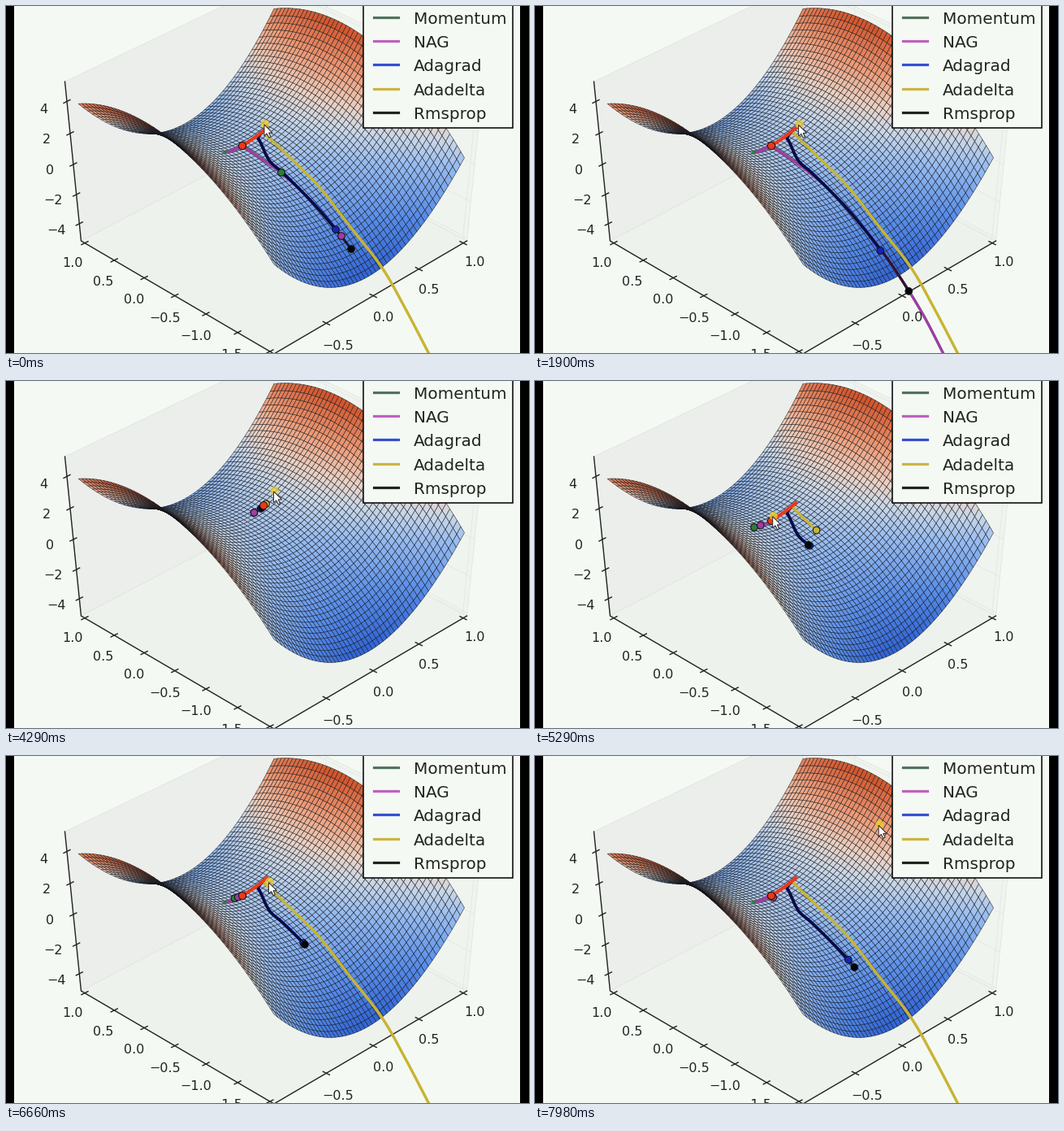
Recreate the animation shown at these times as a matplotlib script. Size 644 by 427 pixels, loop 8000 ms.

```python
import numpy as np
import matplotlib.pyplot as plt
from matplotlib.animation import FuncAnimation
from matplotlib.collections import PolyCollection
from matplotlib.colors import LinearSegmentedColormap
from matplotlib.patches import Circle, Polygon, Rectangle

W, H, DPI = 644, 427, 100
PT = 72 / DPI                       # points per pixel
LOOP, STEP = 8000, 100
RESET, PERIOD = 4150, 9300          # moment the descent restarts, its full length
PAPER, INK = "#f4f9f4", "#20241f"
EDGE = 0.5208                       # panes reach slightly past the unit cube

plt.rcParams["font.family"] = "DejaVu Sans"
# The tiny surplus keeps the pixel size from being rounded down
fig = plt.figure(figsize=((W + 1e-4) / DPI, (H + 1e-4) / DPI), dpi=DPI, facecolor=PAPER)
ax = fig.add_axes([0, 0, 1, 1])
ax.set(xlim=(0, W), ylim=(H, 0))
ax.axis("off")


def project(p, q, h):
    """Map cube coordinates (-.5 to .5) to screen x, y and depth."""
    v, u = (p + q) * 0.7071, (p - q) * 0.7071
    w = 1 - 0.079 * u - 0.0775 * h
    return 330 + 335.5 * v / w, 195 + (177.9 * u - 187.9 * h) / w, w


def corner(p, q, h):
    return project(p * EDGE, q * EDGE, h * EDGE)[:2]


def stroke(points, color=INK, width=1.4, **kw):
    return ax.plot(*zip(*points), color=color, lw=width * PT, **kw)[0]


def label(x, y, text, size=16, ha="center"):
    ax.text(x, y, text, size=size * PT, color=INK, ha=ha,
            va="center_baseline", zorder=31)


def draw_panes():
    walls = [([(-1, -1, -1), (-1, 1, -1), (-1, 1, 1), (-1, -1, 1)], "#ebeeeb"),
             ([(-1, 1, -1), (1, 1, -1), (1, 1, 1), (-1, 1, 1)], "#f0f4ef"),
             ([(-1, -1, -1), (1, -1, -1), (1, 1, -1), (-1, 1, -1)], "#eef2ed")]
    for points, color in walls:
        ax.add_patch(Polygon([corner(*c) for c in points], fc=color, ec="#e2e6e1", lw=0.6))
    for a in np.linspace(-0.5, 0.5, 5):
        stroke([project(a, EDGE, -EDGE)[:2], project(a, EDGE, EDGE)[:2]], "#e6eae5", 1)
        stroke([project(-EDGE, EDGE, a)[:2], project(EDGE, EDGE, a)[:2]], "#e6eae5", 1)
    stroke([corner(-1, -1, 1), corner(-1, -1, -1), corner(1, -1, -1), corner(1, 1, -1)])


def draw_ticks():
    for i in range(7):
        x, y, _ = project(-0.5 + i / 6, -EDGE, -EDGE)
        stroke([(x - 4, y + 2), (x + 4, y - 2)])
        if i < 6:
            label(82 + 37.9 * i, 315 + 22.5 * i, f"{1 - i / 2:.1f}".replace("-", "−"))
    for i in range(4):
        x, y, _ = project(EDGE, 0.5 - i / 4, -EDGE)
        stroke([(x - 4, y - 2), (x + 4, y + 2)])
        label(577 - 56 * i, 314 + 34.2 * i, f"{1 - i / 2:.1f}".replace("-", "−"))
    for i, z in enumerate(range(4, -5, -2)):
        x, y, _ = project(-EDGE, -EDGE, z / 10)
        stroke([(x - 4, y + 2), (x + 4, y - 2)])
        label(46 + 4 * i, 126 + 37.3 * i, str(z).replace("-", "−"))


def draw_surface(n=50):
    a, b = np.meshgrid(np.linspace(1, -2, n + 1), np.linspace(-1, 1, n + 1))
    z = 4.5 * b ** 2 - 1.14 * a ** 2 + 0.5
    x, y, w = project(-(a + 0.5) / 3 * 0.985, b / 2 * 0.985, z / 10)

    def cells(m):
        return np.stack([m[:-1, :-1], m[1:, :-1], m[1:, 1:], m[:-1, 1:]], -1).reshape(-1, 4)

    quads = np.stack([cells(x), cells(y)], -1)
    order = np.argsort(-cells(w).mean(1))
    tones = LinearSegmentedColormap.from_list("saddle", [
        (0.0, "#2f62d4"), (0.22, "#5a8ee8"), (0.45, "#98bcf0"), (0.58, "#ccd8e6"),
        (0.67, "#ecd0c0"), (0.8, "#ee9c78"), (1.0, "#cf5026")])
    heights = (cells(z).mean(1) + 4.1) / 9.1
    ax.add_collection(PolyCollection(
        quads[order], facecolors=tones(heights[order]),
        edgecolors=(0.05, 0.07, 0.1, 0.75), linewidths=0.45, zorder=2))


def draw_legend():
    ax.add_patch(Rectangle((439.5, -40), 184.5, 190, fc=PAPER, ec="black", lw=1.1, zorder=30))
    rows = [("Momentum", "#52735c"), ("NAG", "#bf60bf"), ("Adagrad", "#3450d2"),
            ("Adadelta", "#cdb443"), ("Rmsprop", "#20241f")]
    for i, (name, color) in enumerate(rows):
        y = 14 + 29.2 * i
        stroke([(453, y), (483, y)], color, 3.2, zorder=31)
        label(502, y + 0.5, name, 20, "left")


def spline(points, u):
    """Catmull-Rom curve through the points, u counted in knots."""
    pts = np.asarray(points, float)
    u = np.atleast_1d(u)
    i = np.clip(u.astype(int), 0, len(pts) - 2)
    s = (u - i)[:, None]
    tangent = np.gradient(pts, axis=0)
    p0, p1, m0, m1 = pts[i], pts[i + 1], tangent[i], tangent[i + 1]
    return (p0 * (1 + 2 * s) * (1 - s) ** 2 + m0 * s * (1 - s) ** 2
            + p1 * s ** 2 * (3 - 2 * s) + m1 * s ** 2 * (s - 1))


class Descent:
    """A ball with its trail; knots are (time, x, y)."""

    def __init__(self, knots, color, z, width=3.2, alpha=1, radius=4.3):
        knots = np.array(knots, float)
        self.times, self.points = knots[:, 0], knots[:, 1:]
        self.trail = stroke([(0, 0)], color, width, alpha=alpha, zorder=z)
        self.ball = ax.add_patch(Circle((0, 0), radius, fc=color, ec="#101010",
                                        lw=0.7, zorder=z + 10))

    def update(self, tau):
        end = np.interp(tau, self.times, np.arange(len(self.times)))
        path = spline(self.points, np.linspace(0, end, 120))
        self.trail.set_data(path.T)
        self.ball.center = path[-1]


draw_panes()
draw_ticks()
draw_surface()
draw_legend()
for left, width in ((-2, 12), (633, 20)):
    ax.add_patch(Rectangle((left, -2), width, H + 4, fc="black", zorder=40))

START = [(0, 321, 150)]
SWING = START + [(70, 300, 166), (150, 286, 175)]
VALLEY = [(369, 233), (413, 283), (447, 330), (478, 380), (506, 434)]


def down_valley(*times):
    return [(t, *p) for t, p in zip(times, VALLEY)]


balls = [
    Descent(SWING + [(500, 268, 181), (1500, 275, 178), (3500, 289, 172.5),
                     (4500, 296, 175), (4850, 313, 187), (5150, 339, 205)]
            + down_valley(5300, 5550, 5750, 5900, 6050), "#2f7d3a", 3, 3),
    Descent(SWING + [(500, 273, 180), (1150, 279, 177), (2900, 288, 173),
                     (3900, 295, 175), (4400, 313, 187), (4750, 339, 206)]
            + down_valley(4900, 5150, 5350, 5500, 5650), "#a03ca6", 4, 3.2),
    Descent(START + [(80, 311, 161), (150, 315, 171), (600, 325, 191), (1150, 342, 206),
                     (2500, 367, 231), (3830, 387, 252), (5150, 406, 275),
                     (6230, 418, 291), (8130, 435, 314), (9300, 444, 326)],
            "#1424b8", 5, 3.8),
    Descent(START + [(100, 311, 161), (150, 313, 167), (550, 324, 190), (1150, 340, 205),
                     (2500, 369, 233), (3830, 395, 262), (5150, 425, 299),
                     (6230, 447, 330), (8130, 478, 380), (9300, 500, 418)],
            "#05060c", 6, 3.2, 0.75),
    Descent(START + [(200, 318, 155), (450, 324, 162), (1150, 351, 188), (1500, 386, 223),
                     (1800, 425, 273), (2000, 463, 322), (2150, 491, 371),
                     (2300, 524, 434)], "#c8b432", 7, 3.4),
    Descent(START + [(150, 309, 160), (900, 291, 172)], "#ee3818", 8, 4, radius=4.6),
]

# Pointer tip over the loop, with a soft click highlight
POINTER = np.array([(0, 318, 146), (1080, 325, 145), (2980, 324, 148), (4290, 330, 135),
                    (5290, 289, 170), (6660, 325, 155), (7400, 330, 150),
                    (7980, 438, 75)])
ARROW = np.array([(0, 0), (0, 14), (3.2, 11), (5.8, 16), (8, 15), (5.6, 10), (10, 10)])
glow = ax.add_patch(Circle((0, 0), 5.2, fc="#f2cf2a", alpha=0.75, lw=0, zorder=32))
pointer = ax.add_patch(Polygon(ARROW, fc="white", ec="#222222", lw=0.7, zorder=33))


def update(frame):
    t = frame * STEP
    tau = t - RESET if t >= RESET else t - RESET + PERIOD
    for ball in balls:
        ball.update(tau)
    tip = np.array([np.interp(t, POINTER[:, 0], POINTER[:, k]) for k in (1, 2)])
    glow.center = tip + (1, -1)
    pointer.set_xy(ARROW + tip)
    return []


anim = FuncAnimation(fig, update, frames=LOOP // STEP, interval=STEP,
                     repeat=True, repeat_delay=0)
plt.show()
```
